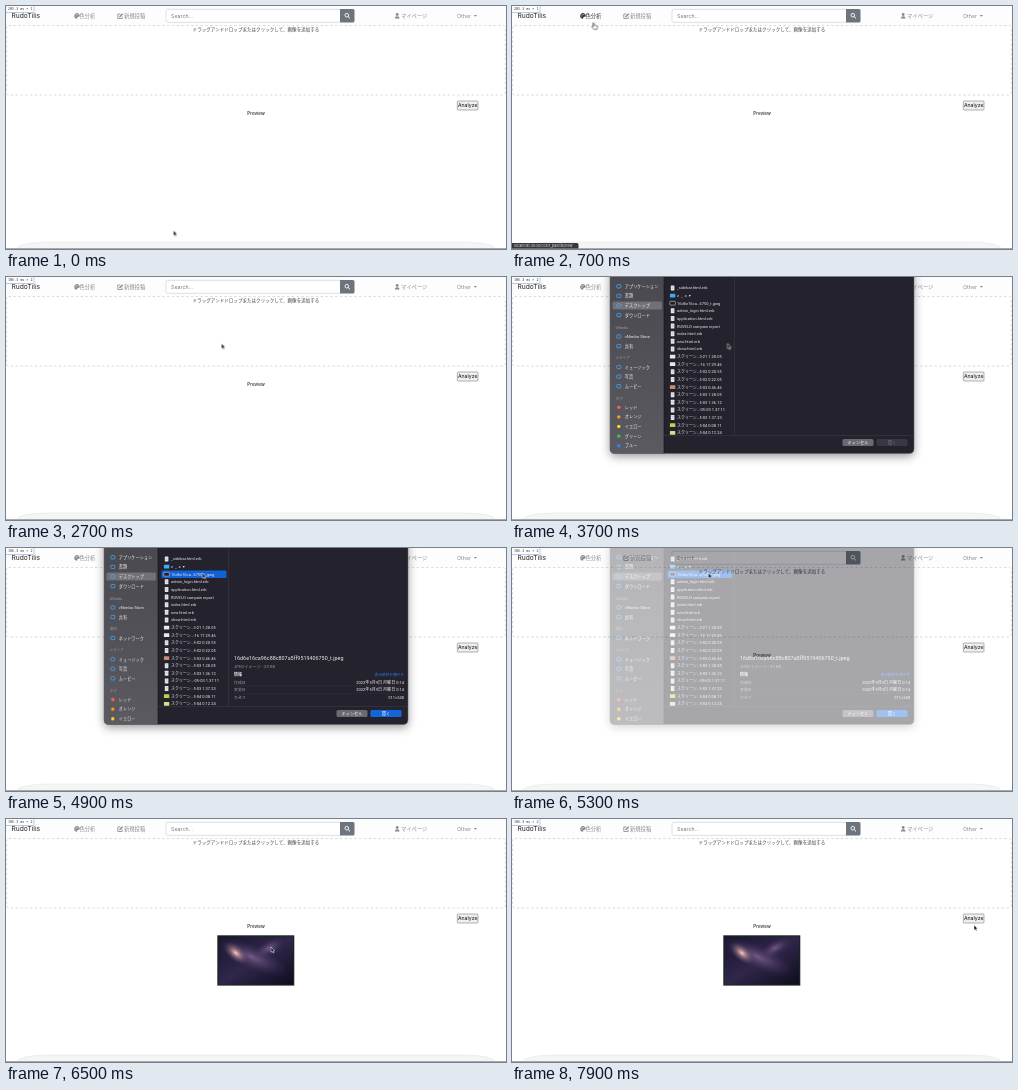
Recreate the animation shown at these times as an HTML page. Size 500 by 243 pixels, loop 8 s.

```html
<!DOCTYPE html>
<html lang="ja">
<head>
<meta charset="utf-8">
<title>Color analysis demo</title>
<style>
  html, body { margin: 0; width: 100%; height: 100%; overflow: hidden; background: #fff; }
  svg { display: block; width: 100vw; height: 100vh; }
  text { font-family: Inter, "Noto Sans CJK JP", "Noto Sans CJK", sans-serif; white-space: pre; }
  .mac text { font-family: Roboto, "Noto Sans CJK JP", "Noto Sans CJK", sans-serif; }
  .mono { font-family: "Noto Sans Mono", monospace; }
  .nav { fill: #8a8a8a; stroke: none; }
  .shadow { filter: drop-shadow(0 3px 5px rgba(0, 0, 0, .4)); }

  /* one shared 8 s loop; everything below changes in hard steps */
  .anim { animation: 8s step-end infinite; }
  #cursor { animation-name: move; }
  #arrow { animation-name: arrow; }
  #hand { animation-name: hand; }
  #beam { animation-name: beam; }
  #status { animation-name: status; }
  #link { animation-name: link; }
  #timeA { animation-name: timeA; }
  #timeB { animation-name: timeB; }
  #dialog { animation-name: dialog; }
  #network { animation-name: network; }
  #lower { animation-name: lower; }
  .picked { animation-name: picked; }
  #photo { animation-name: photo; }

  @keyframes move {
    0% { transform: translate(167.5px, 224.5px); }
    1.25% { transform: translate(167.5px, 224.5px); animation-timing-function: steps(3, start); }
    3.5% { transform: translate(90.5px, 37.5px); }
    5% { transform: translate(90.5px, 37.5px); animation-timing-function: steps(5, start); }
    11.25% { transform: translate(78px, 11.5px); }
    25% { transform: translate(78px, 11.5px); animation-timing-function: steps(8, start); }
    35% { transform: translate(215.5px, 66.5px); }
    47.5% { transform: translate(215.5px, 66.5px); animation-timing-function: steps(8, start); }
    57.5% { transform: translate(196.5px, 25px); }
    71.25% { transform: translate(196.5px, 25px); animation-timing-function: steps(9, start); }
    82.5% { transform: translate(265px, 128px); animation-timing-function: steps(2, start); }
    85% { transform: translate(278px, 144.5px); }
    86.25% { transform: translate(278px, 144.5px); animation-timing-function: steps(9, start); }
    97.5% { transform: translate(460px, 101px); animation-timing-function: steps(2, start); }
    100% { transform: translate(462px, 106px); }
  }
  @keyframes arrow { 0%, 27.5%, 68.75% { opacity: 1; } 8.75%, 67.5% { opacity: 0; } 100% { opacity: 1; } }
  @keyframes hand { 0%, 27.5%, 100% { opacity: 0; } 8.75% { opacity: 1; } }
  @keyframes beam { 0%, 68.75%, 100% { opacity: 0; } 67.5% { opacity: 1; } }
  @keyframes status { 0%, 27.5%, 100% { opacity: 0; } 8.75% { opacity: 1; } }
  @keyframes link { 0%, 26.25%, 100% { fill: #8a8a8a; } 8.75% { fill: #333; } }
  @keyframes timeA { 0% { opacity: 1; } 12.5%, 100% { opacity: 0; } }
  @keyframes timeB { 0% { opacity: 0; } 12.5%, 100% { opacity: 1; } }
  @keyframes dialog { 0%, 67.5%, 100% { opacity: 0; } 46.25% { opacity: 1; } 66.25% { opacity: .4; } }
  @keyframes network { 0% { opacity: 0; } 48.75%, 100% { opacity: 1; } }
  @keyframes lower { 0% { transform: none; } 48.75%, 100% { transform: translateY(21.2px); } }
  @keyframes picked { 0% { opacity: 0; } 57.5%, 100% { opacity: 1; } }
  @keyframes photo { 0% { opacity: 0; } 71.25%, 100% { opacity: 1; } }
</style>
</head>
<body>
<svg viewBox="0 0 500 243" preserveAspectRatio="none">
  <defs>
    <linearGradient id="sky" x1="0" y1="0" x2="1" y2="1">
      <stop offset="0" stop-color="#17152c"/><stop offset=".5" stop-color="#30264a"/><stop offset="1" stop-color="#0d0c1c"/>
    </linearGradient>
    <radialGradient id="haze"><stop offset="0" stop-color="#8b6c96" stop-opacity=".75"/><stop offset="1" stop-color="#3a2a58" stop-opacity="0"/></radialGradient>
    <radialGradient id="core"><stop offset="0" stop-color="#f3d3bd"/><stop offset=".4" stop-color="#b98991" stop-opacity=".6"/><stop offset="1" stop-color="#54406e" stop-opacity="0"/></radialGradient>
    <linearGradient id="side" x1="0" y1="0" x2="0" y2="1"><stop offset="0" stop-color="#49494f"/><stop offset="1" stop-color="#5a5a60"/></linearGradient>
    <clipPath id="window"><path d="M98 0H402V171.500Q402 176.500 397 176.500H103Q98 176.500 98 171.500Z"/></clipPath>
    <clipPath id="list"><path d="M152 0H402V158.500H152Z"/></clipPath>
    <clipPath id="frame"><path d="M212.500 117.500H287V165.500H212.500Z"/></clipPath>
  </defs>

  <rect width="500" height="243" fill="#fff"/>
  <rect width="500" height="19" fill="#fdfdfd"/>

  <!-- lower edge of the screen -->
  <path d="M10 243Q13 236.500 42 236H458Q487 236.500 490 243Z" fill="#f5f5f5" stroke="#e9e9e9" stroke-width=".7"/>
  <path d="M0 242.500H500" stroke="#a9a9a9"/>

  <!-- navigation bar -->
  <g id="bar">
    <g id="link" class="nav anim">
      <path d="M71 7.100C67.800 7.100 67 12.700 70.600 12.700C71.800 12.700 70.700 11 72 10.800C73.500 10.900 73.900 10.300 73.700 9.500C73.400 8 72.400 7.100 71 7.100Z"/>
      <path d="M69.700 10h.01M70.300 8.700h.01M71.800 8.600h.01" stroke="#fdfdfd" stroke-width=".8" stroke-linecap="round"/>
    </g>
    <path d="M114.500 8H111.800V12.500H116.200V10.500" fill="none" stroke="#8a8a8a" stroke-width=".8"/>
    <path d="M113.500 11L116.700 7.700" stroke="#8a8a8a" stroke-width="1.300"/>
    <rect x="160" y="3.300" width="174.500" height="13" rx="1.500" fill="#fff" stroke="#cfd4d9" stroke-width=".7"/>
    <path d="M334 3H347Q348.500 3 348.500 4.500V15Q348.500 16.500 347 16.500H334Z" fill="#6c757d"/>
    <circle cx="340.800" cy="9.200" r="1.800" fill="none" stroke="#fff" stroke-width=".9"/>
    <path d="M342.200 10.600L344 12.400" stroke="#fff" stroke-width="1"/>
    <g class="nav"><circle cx="391.200" cy="8.500" r="1.400"/><path d="M388.800 12.600Q388.800 10.200 391.200 10.200T393.600 12.600Z"/><path d="M467.800 9H471L469.400 10.700Z"/></g>
  </g>

  <!-- request timer -->
  <rect x="-1" y="-1" width="29" height="7.500" rx="1" fill="#fff" stroke="#a6bbdd" stroke-width=".8"/>
  <g id="timeA" class="anim"></g>
  <g id="timeB" class="anim"></g>

  <!-- drop zone and button -->
  <rect x=".6" y="19.600" width="498.800" height="69.400" rx="2" fill="none" stroke="#cfcfcf" stroke-width=".8" stroke-dasharray="2.400 2.400"/>
  <rect x="451.300" y="95" width="20.700" height="9" rx=".8" fill="#efefef" stroke="#808080" stroke-width=".6"/>
  <g id="page"></g>

  <g id="photo" class="anim">
    <rect x="211.300" y="116.300" width="77" height="50.300" fill="#18271f"/>
    <g clip-path="url(#frame)">
      <rect x="212" y="117" width="76" height="49" fill="url(#sky)"/>
      <ellipse cx="246" cy="138" rx="40" ry="13" transform="rotate(24 246 138)" fill="url(#haze)"/>
      <ellipse cx="230" cy="134" rx="15" ry="8" transform="rotate(40 230 134)" fill="url(#core)"/>
      <ellipse cx="263" cy="129" rx="18" ry="8" transform="rotate(-30 263 129)" fill="url(#haze)"/>
    </g>
  </g>

  <g id="status" class="anim">
    <path d="M0 237H65Q66.500 237 66.500 238.500V242.500H0Z" fill="#38383c"/>
  </g>

  <!-- file chooser -->
  <g id="dialog" class="mac anim">
    <path class="shadow" d="M98 -9H402V171.500Q402 176.500 397 176.500H103Q98 176.500 98 171.500Z" fill="#24222d"/>
    <g clip-path="url(#window)">
      <rect x="98" width="54" height="177" fill="url(#side)"/>
      <rect x="100.500" y="24.600" width="49.500" height="8" rx="1.500" fill="#717177"/>
      <path d="M152 0V177" stroke="#15141a" stroke-width=".6"/>
      <g id="upper"></g>
      <g id="network" class="anim"></g>
      <g id="lower" class="anim"></g>
      <path d="M222.500 0V158.500M152 158.500H402" stroke="#3b3944" stroke-width=".6"/>
      <g clip-path="url(#list)">
        <rect class="picked anim" x="155.500" y="22.500" width="65" height="7.600" rx="1.200" fill="#1261d6"/>
        <g id="files"></g>
      </g>
      <rect x="330.500" y="162" width="31" height="7" rx="1.500" fill="#6b6a72"/>
      <rect x="364.500" y="162" width="31" height="7" rx="1.500" fill="#393742"/>
      <g id="buttons"></g>
      <g id="info" class="picked anim">
        <rect x="364.500" y="162" width="31" height="7" rx="1.500" fill="#1464dc"/>
        <path d="M228 138H398M228 145.600H398" stroke="#3b3944" stroke-width=".4"/>
      </g>
    </g>
    <path d="M98 0V171.500Q98 176.500 103 176.500H397Q402 176.500 402 171.500V0" fill="none" stroke="#66656c" stroke-width=".5"/>
  </g>

  <g id="cursor" class="anim">
    <path id="arrow" class="anim" d="M0 0V5.200L1.200 4.200L2.100 6.100L3 5.700L2.200 3.800H3.700Z" fill="#111" stroke="#fff" stroke-width=".5"/>
    <path id="hand" class="anim" d="M.5 .3Q1.300 -.4 1.700 .5V2.600L4.600 3.200Q5.300 3.500 5 4.600L4.400 6.600H1.500L-.7 4.300Q-.6 3.200 .5 4Z" fill="#fff" stroke="#222" stroke-width=".6"/>
    <path id="beam" class="anim" d="M-.7 -2.200Q.8 -2.200 .8 -1.200Q.8 -2.200 2.300 -2.200M.8 -1.400V4.600M-.7 5.400Q.8 5.400 .8 4.400Q.8 5.400 2.300 5.400" fill="none" stroke="#333" stroke-width=".6"/>
  </g>
</svg>
<script>
  const NS = "http://www.w3.org/2000/svg";
  const byId = id => document.getElementById(id);

  function add(parent, tag, attrs) {
    const el = document.createElementNS(NS, tag);
    for (const key in attrs) el.setAttribute(key, attrs[key]);
    return byId(parent).appendChild(el);
  }

  // y is the middle of the line
  function label(parent, x, y, size, fill, text, more) {
    add(parent, "text", { x, y: y + size * .36, "font-size": size, fill, ...more }).textContent = text;
  }

  const END = { "text-anchor": "end" };
  const MID = { "text-anchor": "middle" };

  // page
  label("bar", 5.5, 10, 6.7, "#222", "RudoTilis");
  label("link", 73.4, 10, 5.3, "inherit", "色分析");
  label("bar", 118, 10, 5.3, "#8a8a8a", "新規投稿");
  label("bar", 165, 10, 5.3, "#777", "Search...");
  label("bar", 395, 10, 5.3, "#8a8a8a", "マイページ");
  label("bar", 451, 10, 5.3, "#8a8a8a", "Other");
  const mono = { class: "mono" };
  label("timeA", 2, 3.2, 3.4, "#333", "285.3 ms × 1", mono);
  label("timeB", 2, 3.2, 3.4, "#333", "186.3 ms × 2", mono);
  label("page", 250, 23.7, 4.55, "#444", "ドラッグアンドドロップまたはクリックして、画像を追加する", MID);
  label("page", 250, 107.4, 4.6, "#222", "Preview", { ...MID, "font-weight": 500 });
  label("page", 461.7, 99.5, 5.2, "#111", "Analyze", MID);
  label("status", 2, 239.8, 3.7, "#ddd", "localhost:3000/color_palette/new");

  // sidebar
  const heading = (group, y, text) => label(group, 103.5, y, 3.7, "#9b9ba1", text);
  function place(group, y, text, dot) {
    if (dot) add(group, "circle", { cx: 106.8, cy: y, r: 1.7, fill: dot });
    else add(group, "rect", { x: 104.8, y: y - 1.7, width: 4, height: 3.4, rx: .8, fill: "none", stroke: "#46a8f4", "stroke-width": .8 });
    label(group, 112.8, y, 4.2, "#eee", text);
  }
  const places = (group, y, names) => names.forEach((name, i) => place(group, y + i * 9.6, name));

  places("upper", 9.3, ["アプリケーション", "書類", "デスクトップ", "ダウンロード"]);
  heading("upper", 50.7, "vNimbo");
  places("upper", 59.5, ["vNimbo Store", "共有"]);
  heading("network", 81, "場所");
  place("network", 90, "ネットワーク");
  heading("lower", 81, "メディア");
  places("lower", 90, ["ミュージック", "写真", "ムービー"]);
  heading("lower", 121.3, "タグ");
  [["レッド", "#ff5d55"], ["オレンジ", "#ff9f1a"], ["イエロー", "#ffd426"], ["グリーン", "#35d04f"], ["ブルー", "#1f8bff"]]
    .forEach(([name, color], i) => place("lower", 130.3 + i * 9.6, name, color));

  // file list
  const shots = ["3-21 1.28.05", "-16 17.29.46", "5-02 0.20.55", "5-02 0.22.05", "5-03 0.46.46", "5-03 1.28.05",
    "5-03 1.36.12", "-05-03 1.37.11", "5-03 1.37.23", "5-04 0.08.11", "5-04 0.12.24"];
  const files = ["_sidebar.html.erb", "z  _ .x  ▾", "16d6e16ca…6750_t.jpeg", "admin_login.html.erb", "application.html.erb",
    "RUVELO campain report", "index.html.erb", "new.html.erb", "show.html.erb", ...shots.map(s => "スクリーン…" + s)];
  const tint = { 1: "#3fa9f5", 2: "#1d1a35", 13: "#c98b6b", 18: "#c3d04a", 19: "#d9dd8a" };

  files.forEach((name, i) => {
    const y = 11 + i * 7.62;
    const wide = i in tint || i === 9 || i === 10;
    const w = wide ? 5.4 : 3.6, h = wide ? 3.8 : 5;
    add("files", "rect", { x: 160.6 - w / 2, y: y - h / 2, width: w, height: h, rx: .4,
      fill: tint[i] || "#e8e8ea", stroke: i === 2 ? "#eee" : "none", "stroke-width": .5 });
    if (!wide) add("files", "path", { d: `M159.600 ${y - 1}h2M159.600 ${y + .5}h2`, stroke: "#999", "stroke-width": .4 });
    label("files", 165, y, 4, "#ececee", name);
  });

  // details of the chosen file
  label("buttons", 346, 165.5, 4.2, "#eee", "キャンセル", MID);
  label("buttons", 380, 165.5, 4.2, "#77767d", "開く", MID);
  label("info", 380, 165.5, 4.2, "#fff", "開く", MID);
  label("info", 228, 110.5, 5.4, "#eee", "16d6e16ca96c88c807a5ff9519406750_t.jpeg");
  label("info", 228, 118.2, 4.2, "#96959c", "JPEGイメージ - 25 KB");
  label("info", 228, 126.6, 4, "#eee", "情報", { "font-weight": 700 });
  label("info", 398, 126.6, 3.7, "#2b7cf0", "表示項目を増やす", END);
  const date = "2022年5月9日 月曜日 0:14";
  [["作成日", date], ["変更日", date], ["大きさ", "511×340"]].forEach(([key, value], i) => {
    const y = 134.3 + i * 7.6;
    label("info", 228, y, 3.9, "#96959c", key);
    label("info", 398, y, 4.05, "#eee", value, END);
  });
</script>
</body>
</html>
```
